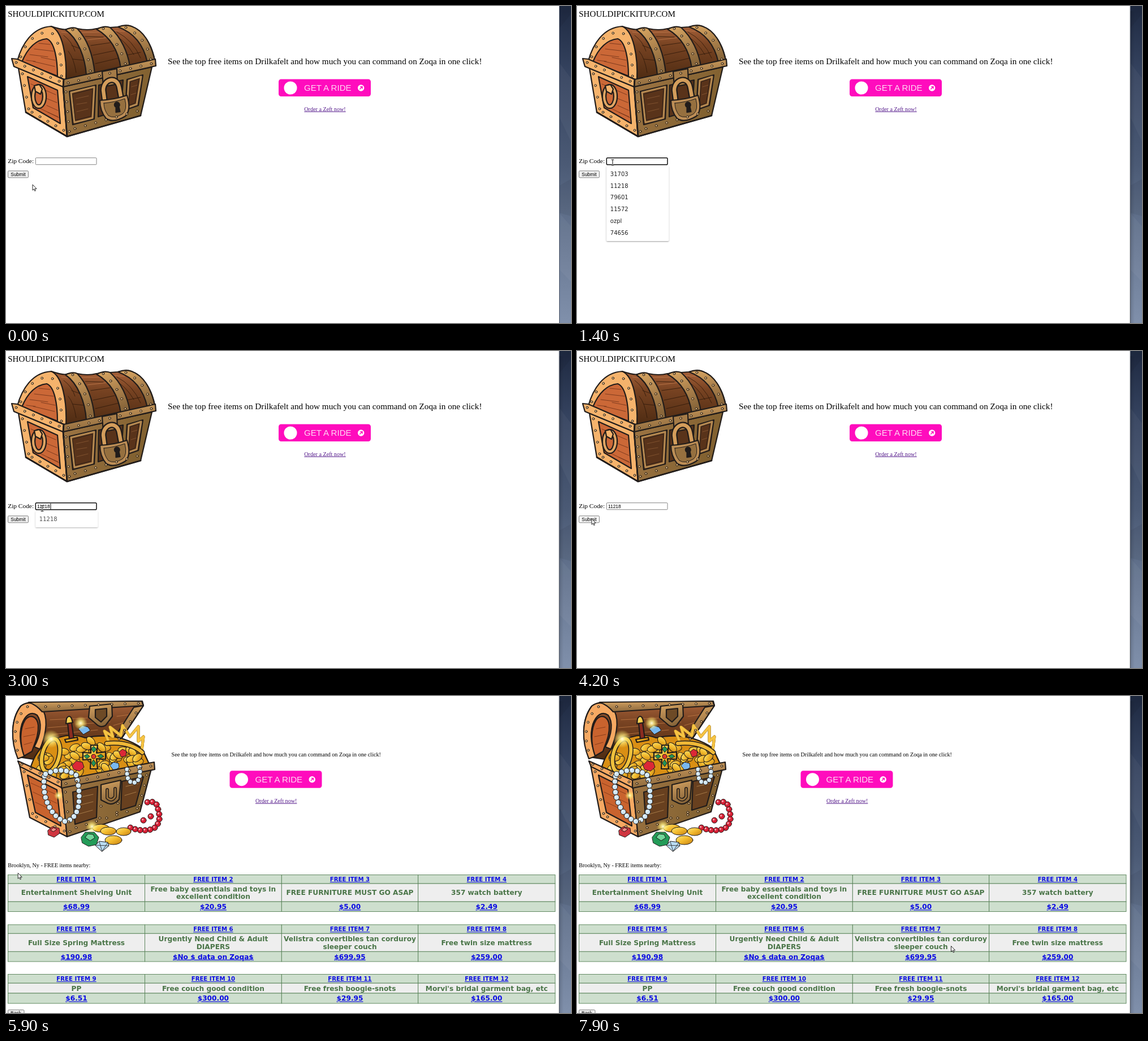
Recreate the animation shown at these times as an HTML page. Size 999x561 px, loop 8000 ms.

```html
<!DOCTYPE html>
<html lang="en">
<head>
<meta charset="utf-8">
<title>Free items</title>
<style>
html, body { margin: 0; width: 100%; height: 100%; overflow: hidden; background: #fff; }
svg { display: block; width: 999px; height: 561px; }
text { font-family: "Liberation Serif", "Times New Roman", serif; font-size: 10.14px; white-space: pre; }
.big { font-size: 15.2px; }
.ui { font: 8.45px "Liberation Sans", Arial, sans-serif; }
.ride { font: 15.1px "Liberation Sans", Arial, sans-serif; fill: #ffd9f4; }
.visited { fill: #551a8b; text-decoration: underline; }
.opt { font: 10px "DejaVu Sans", sans-serif; fill: #222; }
.cell { font: bold 12.17px "DejaVu Sans", sans-serif; fill: #4a7548; text-anchor: middle; }
.link { fill: #0c0ce4; text-decoration: underline; }
.head { font-size: 10.15px; }
.ink { stroke: #211c1a; stroke-width: 2.2; stroke-linejoin: round; stroke-linecap: round; }
.thin { stroke-width: 1; }
.line { fill: none; stroke-width: .8; }
.trim { fill: none; stroke: #b58a52; stroke-width: 3; }
.btn { fill: #efefef; stroke: #767676; stroke-width: .9; }
</style>
</head>
<body>
<svg viewBox="0 0 999 561">
<defs>
  <linearGradient id="sky" x2="0" y2="1">
    <stop stop-color="#1e2941"/><stop offset=".2" stop-color="#34425e"/>
    <stop offset=".5" stop-color="#4b5a75"/><stop offset=".68" stop-color="#61718c"/>
    <stop offset="1" stop-color="#8090ab"/>
  </linearGradient>
  <linearGradient id="lid" x2="0" y2="1">
    <stop stop-color="#a9623a"/><stop offset=".35" stop-color="#784322"/><stop offset="1" stop-color="#4d2b12"/>
  </linearGradient>
  <linearGradient id="strap" x2=".3" y2="1">
    <stop stop-color="#dba863"/><stop offset=".5" stop-color="#b0854f"/><stop offset="1" stop-color="#8a673b"/>
  </linearGradient>
  <linearGradient id="front" x2="1" y2=".3">
    <stop stop-color="#9e7544"/><stop offset="1" stop-color="#80602f"/>
  </linearGradient>
  <linearGradient id="gold" x2="1" y2="1">
    <stop stop-color="#ffe978"/><stop offset=".5" stop-color="#f2b92c"/><stop offset="1" stop-color="#c27c11"/>
  </linearGradient>
  <radialGradient id="shine">
    <stop stop-color="#fffde0"/><stop offset=".35" stop-color="#ffef85" stop-opacity=".8"/>
    <stop offset="1" stop-color="#ffe860" stop-opacity="0"/>
  </radialGradient>
  <linearGradient id="shade">
    <stop stop-color="#000" stop-opacity=".14"/><stop offset="1" stop-color="#000" stop-opacity="0"/>
  </linearGradient>
  <filter id="drop" x="-10%" y="-10%" width="120%" height="125%">
    <feDropShadow dx="0" dy="1" stdDeviation="1.2" flood-opacity=".4"/>
  </filter>
  <g id="ride">
    <rect x="482" y="129.5" width="163" height="30.5" rx="4.5" fill="#ff0cbd"/>
    <circle cx="503" cy="145" r="11.5" fill="#fff"/>
    <text class="ride" x="527" y="150.3">GET A RIDE</text>
    <circle cx="627.7" cy="145" r="5.7" fill="#fff"/>
    <path d="M625.3 147.4l4.3-4.3M626.3 142.8h3.7v3.7" fill="none" stroke="#ff0cbd" stroke-width="1.4"/>
  </g>
</defs>

<g id="search">
  <text class="big" x="3.2" y="19" style="font-size:15.1px">SHOULDIPICKITUP.COM</text>
  <g class="ink" id="shut">
    <path fill="url(#lid)" d="M80 36C92 40 102 43 108 41L126 40Q145 44 160 40L184 38L198 37Q216 32 224 37C244 45 258 70 263 96L106 131C106 90 98 50 80 36Z"/>
    <path class="line" stroke="#2e180a" d="M102 52q14 10 20 28M110 80q10 12 14 38M140 54l32 1M150 70l34-5M154 87l38-8M158 102l42-10M190 50q22 12 36 36M196 46q28 14 42 46M116 70l22 8M118 94l20 2M208 88l30-6"/>
    <path class="line" stroke="#c07a4c" d="M98 46l16 2M134 47l34-1M144 60l34-4M188 43l22 2"/>
    <g fill="url(#strap)">
      <path d="M105 42Q118 36 126 40C145 60 154 90 157 119L142 122C140 92 128 58 105 42Z"/>
      <path d="M160 41Q174 34 184 38C204 56 215 82 219 106L203 110C199 82 186 56 160 41Z"/>
      <path d="M198 37Q212 32 222 36C243 43 257 67 263 96L250 100C244 72 228 48 198 37Z"/>
    </g>
    <path fill="#f5b36c" d="M20 97C28 68 46 38 80 36C100 44 108 90 106 131Z"/>
    <path fill="#cb6837" d="M28 99C38 75 52 60 72 58C86 63 91 95 91 124Z"/>
    <path class="line" stroke="#6d3018" d="M50 76l34 4M42 86l32 4M58 66l20 2M48 98l38 9M62 91l25 5M36 96l16 2"/>
    <path fill="#f5b36c" d="M22 110L101 143L108 231L35 188Z"/>
    <path fill="#cb6837" d="M38 125L91 149L96 208L48 180Z"/>
    <path class="line" stroke="#6d3018" d="M44 138l44 19M70 163l20 8M72 176l20 9M54 178l40 20M74 188l18 8"/>
    <path fill="url(#front)" d="M101 143L258 108L238 194L108 231Z"/>
    <g fill="#59331a">
      <path d="M112 151L159 140L156 200L118 210Z"/>
      <path d="M164 140L207 131L204 184L163 196Z"/>
      <path d="M214 130L242 122L234 176L211 184Z"/>
    </g>
    <path class="trim" d="M115 153L156 143L153 198L121 206ZM217 132L239 125L231 174L214 180Z"/>
    <path class="line" d="M118 156L153 147L150 195L123 202ZM220 134L235 129L228 172L217 176Z"/>
    <path class="line" stroke="#8b5a34" d="M124 164l22-5M125 174l18-3M125 187l20-5M222 143l10-3M221 157l9-3"/>
    <path fill="#f5b36c" d="M10 93L20 94L102 130L101 143L14 107Z"/>
    <path fill="url(#strap)" d="M102 130L264 94L265 106L101 143Z"/>
    <path fill="#a57b47" d="M170 116L196 111L197 138L172 143Z"/>
    <path fill="none" style="stroke-width:11" d="M174 164L172 149C172 129 196 123 200 144L203 160"/>
    <path fill="none" style="stroke:#d39d5b;stroke-width:6.4" d="M174 164L172 149C172 129 196 123 200 144L203 160"/>
    <path fill="#bd8e56" d="M166 167Q190 166 214 158Q222 184 211 195Q190 208 177 199Q166 186 166 167Z"/>
    <path class="thin" fill="#96703f" d="M173 172Q194 170 210 164Q215 184 206 191Q191 200 181 194Q173 184 173 172Z"/>
    <path fill="#211c1a" d="M194.500 179a4.500 4.500 0 1 1 5-1l2 9-7 1Z"/>
    <ellipse cx="58" cy="160" rx="10" ry="18" fill="none" style="stroke-width:8.500"/>
    <ellipse cx="58" cy="160" rx="10" ry="18" fill="none" style="stroke:#e0a563;stroke-width:4"/>
    <path fill="#f5b36c" d="M50 141l9-2 5 8-3 9-9-5Z"/>
    <path fill="none" style="stroke-width:2.800" d="M102 131L101 143L108 231L35 188M108 231L238 194"/>
  </g>
  <text class="big" x="286" y="102.800">See the top free items on Drilkafelt and how much you can command on Zoqa in one click!</text>
  <use href="#ride"/>
  <text class="visited" x="527.300" y="185.600">Order a Zeft now!</text>
  <text x="3.200" y="277.500" style="font-size:11.400px">Zip Code:</text>
  <rect id="box" x="52.300" y="268.700" width="107.700" height="12" fill="#fff"/>
  <text class="ui" id="typed" x="54.900" y="277.800"></text>
  <rect id="caret" y="270" width="1" height="10"/>
  <rect class="btn" id="submit" x="3.500" y="291.800" width="36" height="12" rx="1.600"/>
  <text class="ui" x="8.300" y="300.900">Submit</text>
  <g id="menu">
    <rect id="sheet" x="52.200" y="283" width="110" rx="1.500" fill="#fff" filter="url(#drop)"/>
    <g id="opts"></g>
  </g>
</g>

<g id="results">
  <g class="ink" id="open">
    <path fill="url(#lid)" d="M22 108C8 80 8 42 26 18C40 8 56 12 70 12L241 9L243 17L200 82L76 116Z"/>
    <path class="line" stroke="#c07a46" d="M78 42l66-3M74 56l38-3M82 68l80-8M124 50l60-4M196 36l22-3M190 52l18-5"/>
    <path fill="#f5a963" d="M21 111C8 80 8 42 26 18C38 8 56 12 66 26C76 46 68 76 60 94L50 90C62 68 64 46 55 34C44 26 34 34 28 50C22 70 26 92 34 106Z"/>
    <path fill="#c9632e" d="M32 106C24 84 24 58 34 42C44 30 56 38 57 52C58 72 50 84 46 98Z"/>
    <path class="line" stroke="#7c3517" d="M34 58l16-3M31 72l20-4M32 86l14-4"/>
    <path fill="url(#strap)" d="M40 11L240 9L243 17L64 28Q54 16 40 11Z"/>
    <path fill="url(#strap)" d="M243 17L198 84L188 80L226 20Z"/>
    <path fill="url(#strap)" d="M148 18L187 14L188 36L176 52Q167 57 160 50L146 38Z"/>
    <path fill="#6d4a26" d="M158 24L178 22L178 36L168 46L158 38Z"/>
    <path fill="#d98f14" d="M42 132Q52 92 78 82Q106 62 140 74Q196 62 240 92L254 122L100 160Z"/>
    <g id="coins" class="thin"></g>
    <path fill="#8b2c20" d="M109 48L116 47L120 76L112 77Z"/>
    <path fill="url(#gold)" d="M107 40q5-8 9 0l2 7-12 2ZM104 77l22-4 1 5-21 4Z"/>
    <ellipse cx="79" cy="105" rx="15" ry="30" transform="rotate(14 79 105)" fill="none" style="stroke-width:9"/>
    <ellipse cx="79" cy="105" rx="15" ry="30" transform="rotate(14 79 105)" fill="none" style="stroke:#efc13c;stroke-width:6"/>
    <g fill="none">
      <path id="spikes" style="stroke-width:5" d="M182 82L174 62L189 72L184 55L203 70L206 52L219 72L234 54L234 80L243 72L240 96"/>
      <use href="#spikes" style="stroke:#f0b937"/>
      <path style="stroke:#f6c545;stroke-width:2.500" d="M182 82L174 62L189 72L184 55L203 70L206 52L219 72L234 54L234 80L243 72L240 96"/>
      <path style="stroke-width:9" d="M178 84Q218 80 241 100"/>
      <path style="stroke:#f0b937;stroke-width:6" d="M178 84Q218 80 241 100"/>
    </g>
    <path fill="url(#gold)" d="M150 87l12 0-2 14 16-2 0 13-16-1 2 18-13 0 1-17-14 1 0-13 14 1Z"/>
    <path class="thin" fill="#229558" d="M155 89l5 5-5 6-4-6ZM155 113l4 6-4 6-4-6ZM138 106l6-3 4 4-5 4ZM162 106l6-3 5 4-6 3Z"/>
    <circle cx="155" cy="107" r="4" fill="#e2392e" class="thin"/>
    <path class="thin" fill="#dc2836" d="M117 123l7-8 11 2 3 9-8 7-10-3ZM200 99l6-5 7 4-1 8-8 2Z"/>
    <path class="thin" fill="#79b8ef" d="M184 123l6-6 9 2 1 7-8 7ZM128 58l7-6 10 3 4 6-12 7Z"/>
    <path fill="#f5a963" d="M24 122L99 161L108 249L42 215Z"/>
    <path fill="#c9632e" d="M38 140L90 166L97 230L52 206Z"/>
    <path class="line" stroke="#7c3517" d="M44 154l44 20M48 170l42 20M52 188l42 20"/>
    <path fill="url(#front)" d="M99 161L257 129L237 205L108 249Z"/>
    <path fill="#68401f" d="M118 170L162 160L160 215L122 227ZM205 151L243 143L229 194L203 202Z"/>
    <path class="line" stroke="#b58a52" d="M126 180l28-6M127 194l27-7M128 209l25-7M212 160l22-5M210 176l20-6"/>
    <path fill="#f5a963" d="M21 115L98 149L98 162L25 125Z"/>
    <path fill="url(#strap)" d="M98 149L262 117L263 130L98 163Z"/>
    <path fill="url(#strap)" d="M168 157L203 149L200 183Q190 194 180 190L168 184Z"/>
    <path fill="none" style="stroke-width:6" d="M179 166v14q8 8 14-2v-14"/>
    <path fill="none" style="stroke:#99713d;stroke-width:3" d="M179 166v14q8 8 14-2v-14"/>
    <g id="beads" class="thin"></g>
    <g fill="url(#gold)" class="thin">
      <ellipse cx="168" cy="234" rx="15" ry="7"/><ellipse cx="181" cy="239" rx="14" ry="7"/>
      <ellipse cx="208" cy="240" rx="13" ry="7"/><ellipse cx="190" cy="255" rx="15" ry="8"/>
    </g>
    <path class="thin" fill="#cf3540" d="M74 238l8-7 12 3 1 9-10 7-10-4Z"/>
    <path class="thin" fill="#ff8c88" d="M79 237l5-4 6 3-6 4Z"/>
    <path class="thin" fill="#239b58" d="M133 250l7-9 16 0 8 9-4 13-14 3-11-6Z"/>
    <path class="thin" fill="#73d79a" d="M140 250l5-6 9 1 3 6-8 5Z"/>
    <path class="thin" fill="#b9dcf3" d="M158 264l7-7 15 2 2 6-12 10Z"/>
    <path class="line" d="M158 264l24 1M165 258l5 17 10-16"/>
    <g stroke="none" fill="url(#shine)">
      <circle cx="80" cy="76" r="16"/><circle cx="132" cy="48" r="12"/><circle cx="152" cy="231" r="11"/><circle cx="93" cy="176" r="8"/>
    </g>
  </g>
  <text x="292.600" y="107">See the top free items on Drilkafelt and how much you can command on Zoqa in one click!</text>
  <use href="#ride" x="-86.500" y="2.700"/>
  <text class="visited" x="441" y="188.700">Order a Zeft now!</text>
  <text x="3.200" y="303">Brooklyn, Ny - FREE items nearby:</text>
  <g id="tables"></g>
  <rect class="btn" x="3.500" y="555.500" width="28.500" height="12" rx="1.600"/>
  <text class="ui" x="8" y="564">Back</text>
</g>

<rect x="978" width="21" height="561" fill="url(#sky)"/>
<path d="M978 100L999 128V240L978 196ZM978 466L999 488V390L978 366Z" fill="#fff" opacity=".04"/>
<path d="M978 318L999 306V372L978 366ZM978 0H999V14L978 40Z" fill="#000" opacity=".06"/>
<rect id="edge" x="978" width="1" height="561" fill="#4c5566"/>
<g id="glow">
  <rect x="978" y="9" width="8" height="552" fill="url(#shade)"/>
  <rect x="976.500" width="1.500" height="561" fill="#dedfe1"/>
</g>

<path id="arrow" d="M.5.5V10.600L2.800 8.500 4.400 12 5.900 11.300 4.400 7.900H7.600Z" fill="#fff" stroke="#111" stroke-width=".9"/>
<g id="beam" fill="none">
  <path d="M-2.500-5H2.500M0-5V5M-2.500 5H2.500" stroke="#fff" stroke-width="2.200"/>
  <path d="M-2.500-5H2.500M0-5V5M-2.500 5H2.500" stroke="#222" stroke-width="1.100"/>
</g>
</svg>
<script>
const $ = id => document.getElementById(id);

function add(parent, tag, attrs, text) {
  const el = document.createElementNS("http://www.w3.org/2000/svg", tag);
  for (const k in attrs) el.setAttribute(k, attrs[k]);
  if (text) el.textContent = text;
  return parent.appendChild(el);
}

// n dots spread evenly along a path
function dots(parent, d, n, r, fill) {
  const path = add(parent, "path", { d });
  path.remove();
  const len = path.getTotalLength();
  for (let i = 0; i < n; i++) {
    const p = path.getPointAtLength(len * i / (n - 1));
    add(parent, "circle", { cx: p.x, cy: p.y, r, fill, "stroke-width": 1 });
    add(parent, "circle", { cx: p.x - r / 4, cy: p.y - r / 4, r: r / 3, fill: "#fff", stroke: "none", opacity: .6 });
  }
}

const rivet = (g, d, n) => dots($(g), d, n, 1.9, "#e3b270");
[
  ["M18 100L94 133", 6], ["M110 136L257 102", 9], ["M26 90C36 60 56 46 78 46C94 54 98 92 98 124", 9],
  ["M29 120L40 182", 4], ["M46 188L102 220", 5], ["M106 152L112 222", 5], ["M122 217L232 186", 7],
  ["M118 42Q144 70 149 115", 5], ["M172 40Q200 64 211 102", 5], ["M212 38Q248 56 256 94", 5]
].forEach(a => rivet("shut", ...a));
[
  ["M28 121L92 152", 5], ["M106 155L256 124", 9], ["M20 96C11 66 18 34 38 19", 6], ["M70 19L234 13", 8],
  ["M32 134L47 208", 4], ["M54 214L103 239", 4], ["M105 170L113 240", 5], ["M124 233L232 199", 7],
  ["M168 195L166 216", 2], ["M198 190L196 206", 2], ["M249 140L236 194", 4], ["M230 30L200 76", 4]
].forEach(a => rivet("open", ...a));

let seed = 7;
const rnd = () => (seed = seed * 16807 % 2147483647) / 2147483647;
for (let i = 0; i < 65; i++) {
  const x = 62 + rnd() * 180;
  const top = 78 + Math.abs(x - 140) * .2, low = 148 - Math.max(0, x - 100) * .19;
  const y = top + (low - top) * rnd();
  add($("coins"), "ellipse", {
    cx: x, cy: y, rx: 9.5, ry: 6, fill: "url(#gold)", transform: `rotate(${rnd() * 120 - 60} ${x} ${y})`
  });
}
const beads = $("beads");
dots(beads, "M68 142C62 182 82 216 105 222C138 216 130 160 124 140Q100 124 70 138", 27, 4.8, "#cfe5f2");
dots(beads, "M214 130Q213 156 228 153Q240 148 236 126", 9, 4.2, "#cfe5f2");
dots(beads, "M250 188Q268 184 269 202Q276 222 262 234Q244 242 220 233", 13, 5, "#d91f35");
dots(beads, "M243 220L256 213", 2, 5, "#d91f35");

// result tables: top, row heights, titles and prices
const cols = [3.5, 245.5, 487.3, 728.7, 971];
const tables = [
  [316.5, [15.5, 32, 17.5], [
    ["Entertainment Shelving Unit", "$68.99"],
    ["Free baby essentials and toys in|excellent condition", "$20.95"],
    ["FREE FURNITURE MUST GO ASAP", "$5.00"],
    ["357 watch battery", "$2.49"]]],
  [404.8, [15.5, 32, 17.7], [
    ["Full Size Spring Mattress", "$190.98"],
    ["Urgently Need Child & Adult|DIAPERS", "$No $ data on Zoqa$"],
    ["Velistra convertibles tan corduroy|sleeper couch", "$699.95"],
    ["Free twin size mattress", "$259.00"]]],
  [492.5, [15.7, 17.8, 18], [
    ["PP", "$6.51"],
    ["Free couch good condition", "$300.00"],
    ["Free fresh boogie-snots", "$29.95"],
    ["Morvi's bridal garment bag, etc", "$165.00"]]]
];
tables.forEach(([top, heights, items], k) => items.forEach(([title, price], c) => {
  const x = cols[c], width = cols[c + 1] - x;
  const rows = [["FREE ITEM " + (k * 4 + c + 1)], title.split("|"), [price]];
  let y = top;
  rows.forEach((lines, r) => {
    const height = heights[r];
    add($("tables"), "rect", { x, y, width, height, fill: r == 1 ? "#eee" : "#cedfce", stroke: "#568056", "stroke-width": .9 });
    lines.forEach((line, i) => add($("tables"), "text", {
      class: "cell" + (r == 1 ? "" : " link") + (r ? "" : " head"),
      x: x + width / 2,
      y: y + height / 2 + (r ? 4.4 : 3.7) + (i - (lines.length - 1) / 2) * 13.7
    }, line));
    y += height;
  });
}));

// pointer path: time, x, y
const path = [
  [100, 46.5, 315.5], [200, 47, 314], [500, 52, 300], [700, 60, 284], [900, 63, 277],
  [2900, 63, 277], [3000, 64, 278.5], [3300, 58, 286], [3600, 36, 295], [3800, 28, 296.5],
  [4000, 25.5, 296.5], [5700, 25.5, 296.5], [5800, 25, 299], [6100, 12, 340], [6300, 7.5, 375],
  [6600, 15, 410], [6700, 28, 426], [6800, 28, 426], [6900, 178, 487], [7000, 275, 518],
  [7100, 360, 527], [7300, 505, 514], [7500, 600, 485], [7700, 650, 456], [7900, 661, 442]
];
function pointer(t) {
  const i = path.findIndex(p => p[0] > t);
  if (i < 1) return path[i ? path.length - 1 : 0].slice(1);
  const [a, b] = [path[i - 1], path[i]], f = (t - a[0]) / (b[0] - a[0]);
  return [a[1] + (b[1] - a[1]) * f, a[2] + (b[2] - a[2]) * f];
}

const zip = "11218", keys = [1800, 2000, 2200, 2400, 3000];
const saved = ["31703", "11218", "79601", "11572", "ozpl", "74656"];
const known = ["31703", "11218", "79601", "11572", "11203"];
const show = (id, on) => $(id).style.display = on ? "" : "none";
const set = (id, attrs) => { for (const k in attrs) $(id).setAttribute(k, attrs[k]); };

let last = -1;
function draw(t) {
  if (t === last) return;
  last = t;
  const focus = t >= 900 && t < 4200, n = keys.filter(k => k <= t).length;
  show("search", t < 4300);
  show("results", t >= 4300);
  show("glow", t >= 900);

  set("box", { stroke: focus ? "#101010" : "#767676", "stroke-width": focus ? 1.5 : .9, rx: focus ? 1.8 : 1.2 });
  $("typed").textContent = zip.slice(0, n);
  show("caret", focus && !(t >= 1400 && t < 1800) && t < 3500);
  set("caret", { x: 55 + n * 4.7 });

  show("menu", focus && t < 3100);
  set("menu", { opacity: t >= 3000 ? .78 : 1 });
  const list = n ? known.filter(s => s.includes(zip.slice(0, Math.min(n, 4)))) : saved;
  set("sheet", { height: 29 + (list.length - 1) * 20.8 });
  $("opts").replaceChildren();
  list.forEach((s, i) => add($("opts"), "text", { class: "opt", x: 58.8, y: 300.7 + i * 20.8 }, s));

  const [x, y] = pointer(t);
  const beam = t < 4300 && x > 52 && x < 160 && y > 268 && y < 281;
  const hover = t < 4300 && x < 39 && y > 292 && y < 304;
  $("submit").style.fill = !hover ? "" : t >= 4200 ? "#f5f5f5" : "#e5e5e5";
  show("beam", beam);
  show("arrow", !beam);
  set(beam ? "beam" : "arrow", { transform: `translate(${x} ${y})` });
}

const start = performance.now();
function tick() {
  const t = (performance.now() - start) % 8000;
  draw(Math.floor(t / 100) * 100);
  requestAnimationFrame(tick);
}
tick();
</script>
</body>
</html>
```
